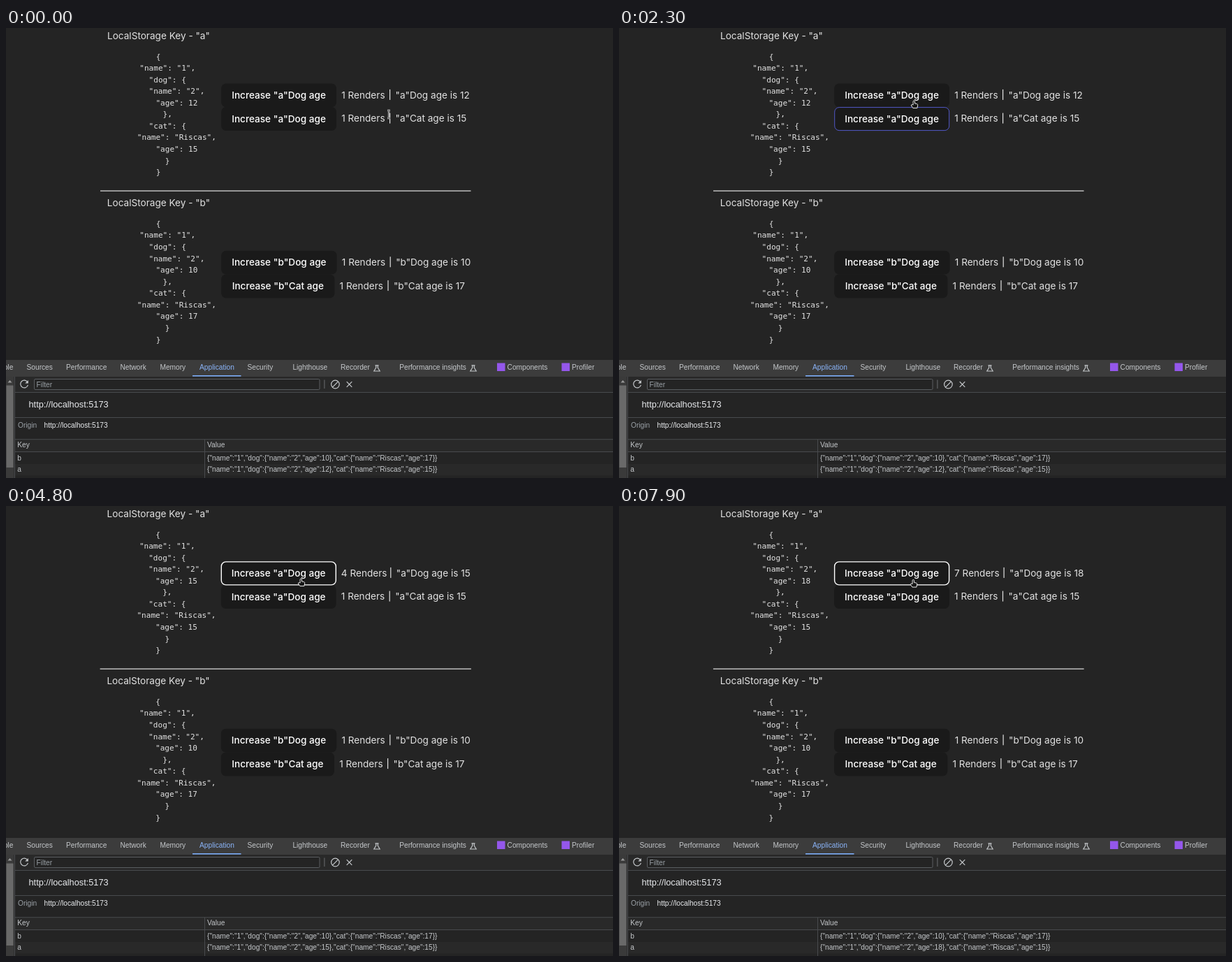
An HTML page that plays this animation: 869 by 644 pixels, repeating every 8 s.

```html
<!DOCTYPE html>
<html lang="en">
<head>
<meta charset="utf-8">
<title>Local storage demo</title>
<style>
html, body { margin: 0; width: 100%; height: 100%; overflow: hidden; background: #242424 }
svg { display: block }
text { white-space: pre }
.ui { font: 13.6px Inter, sans-serif; fill: #e2e2e2 }
.btn { font: 500 13.6px Inter, sans-serif; fill: #fff; text-anchor: middle }
.json { font: 11.05px "DejaVu Sans Mono", monospace; fill: #e2e2e2; text-anchor: middle }
.dev { font: 10.2px "Liberation Sans", Arial, sans-serif; fill: #c4c7ca }
.icon { fill: none; stroke: #c4c7ca; stroke-width: 1.2 }
</style>
</head>
<body>
<svg width="869" height="644" viewBox="0 0 869 644"><g id="page"></g><g id="tools"></g><g id="pointer"></g></svg>
<script>
const LOOP = 8000, TICK = 100;
const clicks = [3100, 4000, 4800, 5500, 6900, 7800];
// Centred layout nudges sideways as the digits change width.
const nudges = [0, -.4, -.8, -.4, -.3, -.2, -.1];
const $ = id => document.getElementById(id);

const text = (cls, x, y, s, extra = '') => `<text class="${cls}" x="${x}" y="${y}" ${extra}>${s}</text>`;
const rect = (x, y, w, h, fill, extra = '') =>
  `<rect x="${x}" y="${y}" width="${w}" height="${h}" fill="${fill}" ${extra}/>`;
const path = (d, extra = 'class="icon"') => `<path d="${d}" ${extra}/>`;

const stored = (dog, cat) =>
  `{"name":"1","dog":{"name":"2","age":${dog}},"cat":{"name":"Riscas","age":${cat}}}`;

function jsonBlock(dog, cat, x, y) {
  const lines = [
    [0, '{'], [1, '"name": "1",'], [1, '"dog": {'], [2, '"name": "2",'], [2, `"age": ${dog}`], [1, '},'],
    [1, '"cat": {'], [2, '"name": "Riscas",'], [2, `"age": ${cat}`], [1, '}'], [0, '}']
  ];
  return lines.map(([depth, s], i) => text('json', x + 13.2 * depth, y + 16.57 * i, s)).join('');
}

function counterRow(x, y, width, label, renders, info) {
  const left = x + width + 7.2, wide = renders > 1 ? 1.6 : 0;
  return rect(x, y, width, 33.8, '#1a1a1a', 'rx="6.8"') +
    text('btn', x + width / 2, y + 21.6, label) +
    text('ui', left, y + 21.1, renders + ' Renders') +
    rect(left + 68.8 + wide, y + 8.5, 1.2, 15, '#e2e2e2') +
    text('ui', left + 77.4 + wide, y + 21.1, info);
}

function border(x, y, color, opacity, width) {
  return opacity ? rect(x + .5, y + .5, 164, 33, 'none',
    `rx="6.5" stroke="${color}" stroke-width="${width}" opacity="${opacity}"`) : '';
}

function page(t) {
  const n = 1 + clicks.filter(c => t >= c).length, dx = nudges[n - 1], x = 308.2 + dx;
  const focused = n > 1;
  const upperHover = focused || t < 2400 ? 0 : t < 2800 ? .4 : 1;
  const lowerHover = t < 2200 || t >= 2800 ? 0 : t < 2300 ? .5 : t < 2400 ? .85 : .4;
  return text('ui', 145 + dx, 15.7, 'LocalStorage Key - "a"') +
    jsonBlock(11 + n, 15, 218 + dx, 44.5) +
    counterRow(x, 79.4, 164.8, 'Increase "a"Dog age', n, `"a"Dog age is ${11 + n}`) +
    counterRow(x, 113.1, 164.8, 'Increase "a"Dog age', 1, '"a"Cat age is 15') +
    border(x, 113.1, '#646cff', lowerHover, .9) +
    border(x, 79.4, '#646cff', upperHover, .9) +
    border(x, 79.4, '#fff', +focused, 1.4) +
    rect(135 + dx, 232.5, 530.5 - 2 * dx, 1.2, '#e2e2e2') +
    text('ui', 144.8 + dx, 254.9, 'LocalStorage Key - "b"') +
    jsonBlock(10, 17, 218 + dx, 283.8) +
    counterRow(x, 318.8, 165.4, 'Increase "b"Dog age', 1, '"b"Dog age is 10') +
    counterRow(x, 352.6, 162.2, 'Increase "b"Cat age', 1, '"b"Cat age is 17');
}

const flask = x => path(`M${x - 2.5} 482.8h5M${x - 1.3} 483v3.2l-2.9 4.8h8.4l-2.9-4.8V483`);

function tools(t) {
  const n = 1 + clicks.filter(c => t >= c).length;
  const tabs = [['Sources', 29.5], ['Performance', 86], ['Network', 163.4], ['Memory', 220.4],
    ['Application', 277], ['Security', 345.5], ['Lighthouse', 410.4], ['Recorder', 479],
    ['Performance insights', 563.2], ['Components', 717.6], ['Profiler', 810]];
  const rule = y => rect(13, y, 856, 1, '#484a4d');
  const white = 'style="fill:#e8eaed"', dim = 'style="fill:#9aa0a6"';
  return rect(0, 475, 869, 169, '#242424') +
    rect(0, 475, 869, 24, '#3c3c3c') +
    text('dev', 10.3, 489.2, 'Console', 'text-anchor="end"') +
    tabs.map(([s, x]) => text('dev', x, 489.2, s, s == 'Application' ? 'style="fill:#8ab4f8"' : '')).join('') +
    rect(267, 497, 69.5, 1.6, '#7cacf8') +
    flask(531) + flask(669) +
    rect(703, 479.5, 11.5, 11.5, '#9457eb') + rect(795.5, 479.5, 11.5, 11.5, '#9457eb') +
    // sidebar scrollbar
    rect(0, 499, 11.5, 145, '#3a3a3a') + rect(.5, 511.5, 10, 117.5, '#696969') +
    path('M2.5 507.5L5.5 504l3 3.5z', 'fill="#9a9a9a"') +
    rect(12, 499, 1, 145, '#484a4d') +
    // filter bar
    rect(13, 499, 856, 22, '#292929') +
    path('M30.8 506.7A5.4 5.4 0 1 0 31.4 510.8') + path('M31.9 503.9v4.6h-4.6z', 'fill="#c4c7ca"') +
    rect(40.5, 502.5, 408.5, 15, '#242424', 'stroke="#5a5d61" rx="1.5"') +
    text('dev', 43.5, 513.5, 'Filter', dim) +
    rect(455.4, 503.5, 1, 12.5, '#6a6d70') +
    path('M477.2 510a5.8 5.8 0 1 1-11.6 0a5.8 5.8 0 1 1 11.6 0M467.4 514.1l8.2-8.2') +
    path('M487.7 506.2l7.6 7.6m0-7.6l-7.6 7.6') +
    rule(521) +
    text('dev', 32.5, 542.6, 'http://localhost:5173', 'style="fill:#e8eaed;font-size:12.75px"') +
    rule(557) +
    text('dev', 17, 572.2, 'Origin', dim) + text('dev', 54.5, 572.2, 'http://localhost:5173', white) +
    // table
    rect(13, 589, 856, 17, '#292929') + rule(588.2) + rule(606) +
    (t >= 900 && t < 1600 ? rect(13, 607, 856, 17, '#3c3c3c') : '') +
    rect(13, 624, 856, 16.5, '#292929') +
    rect(284, 589, 1, 55, '#484a4d') +
    text('dev', 16.3, 600.3, 'Key') + text('dev', 288, 600.3, 'Value') +
    text('dev', 16.3, 618.8, 'b') + text('dev', 288, 618.8, stored(10, 17)) +
    text('dev', 16.3, 635.3, 'a') + text('dev', 288, 635.3, stored(11 + n, 15));
}

// Each move: first visible step, last step, destination.
const moves = [[200, 900, 478, 610], [1200, 1500, 465, 622], [1600, 1600, 462, 640],
  [1800, 2300, 422.5, 104], [7900, 7900, 421.5, 105.5]];

function pointer(t) {
  let x = 548, y = 123.5;
  for (const [from, to, endX, endY] of moves) {
    if (t < from) break;
    const p = Math.min(1, (t - from + TICK) / (to - from + TICK)), e = p * p * (3 - 2 * p);
    x += (endX - x) * e;
    y += (endY - y) * e;
  }
  const at = `transform="translate(${x} ${y})"`;
  if (t < 200) {
    const beam = 'M-2-5.5H2M0-5.5V5.5M-2 5.5H2';
    return path(beam, `${at} stroke="#ddd" stroke-width="2.3"`) + path(beam, `${at} stroke="#222" stroke-width=".8"`);
  }
  const overButton = t >= 1800 && (y > 79 && y < 147 || y > 319 && y < 386);
  const shape = overButton
    ? 'M-1.4 6V1.2Q-1.4 0-.2 0T1 1.2V4L4 4.6Q5.4 5 5.2 6.4L4.4 10.6H-1.6L-4.2 7Q-4 5.4-2.8 5.6Z'
    : 'M0 0V11L2.6 8.7L4.4 12.4L6 11.6L4.3 8.1H7.6Z';
  return path(shape, `${at} fill="#151515" stroke="#fff" stroke-width=".9" stroke-linejoin="round"`);
}

let last = -1;
function frame() {
  const t = Math.floor(performance.now() % LOOP / TICK) * TICK;
  if (t !== last) {
    last = t;
    $('page').innerHTML = page(t);
    $('tools').innerHTML = tools(t);
    $('pointer').innerHTML = pointer(t);
  }
  requestAnimationFrame(frame);
}
frame();
</script>
</body>
</html>
```
